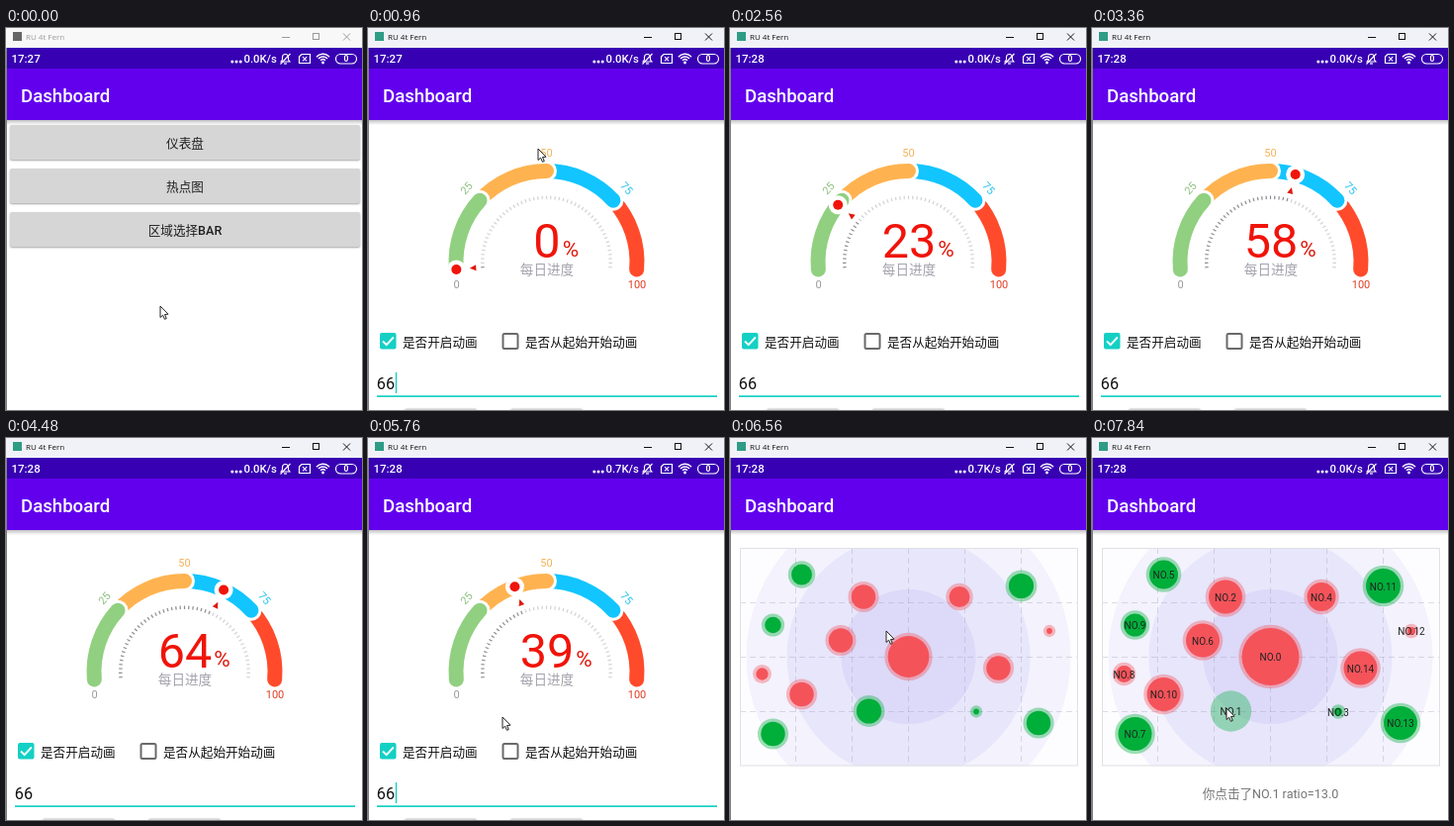
Recreate the animation shown at these times as an HTML page with a canvas. Size 360 by 386 pixels, loop 8 s.

```html
<!DOCTYPE html>
<html lang="zh">
<head>
<meta charset="utf-8">
<title>Dashboard</title>
<style>
html, body { margin: 0; width: 100%; height: 100%; overflow: hidden; background: #fff; }
canvas { display: block; width: 360px; height: 386px; }
</style>
</head>
<body>
<canvas id="stage"></canvas>
<script>
const W = 360, H = 386, LOOP = 8000, STEP = 160;
const canvas = document.getElementById('stage');
const ratio = window.devicePixelRatio || 1;
canvas.width = W * ratio;
canvas.height = H * ratio;
const ctx = canvas.getContext('2d');
const FAMILY = "Roboto, 'Noto Sans CJK SC', 'Noto Sans CJK', sans-serif";
const RED = '#f0140a', TEAL = '#14d0c4', GREY = '#d6d6d6';

// Scene times
const GAUGE_AT = 960, MENU_AT = 6000, HEAT_AT = 6320, GROWN_AT = 6653, CLICK_AT = 7360;

const pointerPath = [
  [0, 156, 281], [240, 156, 281], [640, 172, 122], [960, 172, 122],
  [1760, 143, 297], [2080, 170, 392], [5200, 110, 392], [5760, 136, 282],
  [6160, 165, 163], [6320, 165, 163], [6560, 158, 195], [7200, 136, 273], [LOOP, 136, 273]
];
const valuePath = [
  [GAUGE_AT, 0], [1600, 20.4], [2500, 20.4], [3360, 58.4], [4480, 63.5],
  [5000, 66], [5200, 66], [5760, 39.2], [MENU_AT, 28]
];

// x, y, radius, 1 = red / 0 = green; the index is the label
const spots = [
  [180.5, 221, 29, 1], [140.5, 276, 17.5, 0], [135, 160.5, 17, 1], [249, 276.5, 4, 0],
  [232, 160.5, 14.5, 1], [72.5, 138, 14.5, 0], [112, 204.5, 17, 1], [43.5, 299, 17, 0],
  [32.5, 238.5, 8.5, 1], [43.5, 189, 11.5, 0], [72.5, 259, 17, 1], [294.5, 149.5, 17.5, 0],
  [323, 195, 4, 1], [312, 288, 17, 0], [271.5, 232.5, 17, 1]
];

function sample(path, t, col) {
  if (t <= path[0][0]) return path[0][col];
  for (let i = 1; i < path.length; i++) {
    const a = path[i - 1], b = path[i];
    if (t <= b[0]) return a[col] + (b[col] - a[col]) * (t - a[0]) / (b[0] - a[0]);
  }
  return path[path.length - 1][col];
}

function rect(x, y, w, h, fill) {
  ctx.fillStyle = fill;
  ctx.fillRect(x, y, w, h);
}

function text(str, x, y, size, fill, align = 'left', weight = 400, family = FAMILY) {
  ctx.font = `${weight} ${size}px ${family}`;
  ctx.textAlign = align;
  ctx.fillStyle = fill;
  ctx.fillText(str, x, y);
}

function disc(x, y, r, fill) {
  ctx.beginPath();
  ctx.arc(x, y, r, 0, Math.PI * 2);
  ctx.fillStyle = fill;
  ctx.fill();
}

function line(points, stroke, width = 1) {
  ctx.beginPath();
  points.forEach(([x, y], i) => i ? ctx.lineTo(x, y) : ctx.moveTo(x, y));
  ctx.strokeStyle = stroke;
  ctx.lineWidth = width;
  ctx.stroke();
}

function roundBox(x, y, w, h, r) {
  ctx.beginPath();
  ctx.roundRect(x, y, w, h, r);
}

function button(x, y, w, label) {
  ctx.save();
  ctx.shadowColor = 'rgba(0,0,0,.35)';
  ctx.shadowBlur = 2 * ratio;
  ctx.shadowOffsetY = ratio;
  roundBox(x, y, w, 35, 2);
  ctx.fillStyle = GREY;
  ctx.fill();
  ctx.restore();
  if (label) text(label, x + w / 2, y + 22.5, 12.6, '#212121', 'center', 500);
}

function titleBar(active) {
  const ink = active ? '#111' : '#999';
  rect(0, 0, W, 20, active ? '#f1f2f8' : '#f8f8f8');
  rect(7, 4, 9, 9, active ? '#2f9c86' : '#666');
  text('RU 4t Fern', 20, 12, 8, ink, 'left', 400, "'Open Sans', sans-serif");
  line([[279, 9.5], [287, 9.5]], ink);
  ctx.strokeRect(310.5, 5.5, 6, 6);
  line([[341, 5.5], [348, 12.5]], ink);
  line([[348, 5.5], [341, 12.5]], ink);
}

function statusBar(t) {
  const clock = t < 2560 ? '17:27' : '17:28';
  const busy = t >= 5200 && t < 7200;
  const speed = busy ? '0.7' : t >= 1120 && t < 2400 ? '0.3' : '0.0';
  rect(0, 20, W, 21, '#3700b3');
  text(clock, 5.5, 35, 11.5, '#fff', 'left', 500);
  for (let i = 0; i < 3; i++) disc(228.8 + i * 4.2, 34, 1.5, '#fff');
  text(speed + 'K/s', 240.5, 35, 11.3, '#fff', 'left', 500);

  // Muted bell
  ctx.beginPath();
  ctx.moveTo(278, 34);
  ctx.lineTo(279.5, 32);
  ctx.lineTo(279.5, 29.5);
  ctx.arc(282.5, 29.5, 3, Math.PI, 0);
  ctx.lineTo(285.5, 32);
  ctx.lineTo(287, 34);
  ctx.closePath();
  ctx.strokeStyle = '#fff';
  ctx.lineWidth = 1.1;
  ctx.stroke();
  line([[281, 36], [284, 36]], '#fff', 1.2);
  line([[277.5, 36.5], [287.5, 26]], '#fff', 1.1);

  // Empty card slot
  line([[299, 26.5], [307.5, 26.5], [307.5, 35.5], [296.5, 35.5], [296.5, 29], [299, 26.5]], '#fff', 1.2);
  line([[300, 29.2], [304.2, 33.4]], '#fff', 1.1);
  line([[304.2, 29.2], [300, 33.4]], '#fff', 1.1);

  // Wireless
  for (const r of [3.3, 6, 8.7]) {
    ctx.beginPath();
    ctx.arc(320.5, 35, r, -Math.PI * .77, -Math.PI * .23);
    ctx.lineWidth = 1.5;
    ctx.stroke();
  }
  disc(320.5, 35, 1.4, '#fff');

  roundBox(333.5, 26.5, 21, 9.5, 4.7);
  ctx.lineWidth = 1.2;
  ctx.stroke();
  text('0', 344, 34.3, 8.5, '#fff', 'center', 700);
}

function toolBar() {
  rect(0, 41, W, 52, '#6200ee');
  const shade = ctx.createLinearGradient(0, 93, 0, 98);
  shade.addColorStop(0, 'rgba(0,0,0,.24)');
  shade.addColorStop(1, 'rgba(0,0,0,0)');
  rect(0, 93, W, 5, shade);
  text('Dashboard', 15, 75, 18.6, '#fff', 'left', 500);
}

function menu() {
  ['仪表盘', '热点图', '区域选择BAR'].forEach((label, i) => button(4, 98 + i * 44, 354, label));
}

const CX = 180.5, CY = 236, R = 91.5;
const angleOf = v => (-185 + v * 1.9) * Math.PI / 180;
const polar = (v, r) => [CX + r * Math.cos(angleOf(v)), CY + r * Math.sin(angleOf(v))];

function band(from, to, color) {
  ctx.lineCap = 'round';
  for (const [stroke, width] of [['#fff', 21], [color, 15]]) {
    // Only the leading end shows the white edge
    ctx.beginPath();
    ctx.arc(CX, CY, R, angleOf(stroke === '#fff' ? to - .1 : from), angleOf(to));
    ctx.strokeStyle = stroke;
    ctx.lineWidth = width;
    ctx.stroke();
  }
  ctx.lineCap = 'butt';
}

function dialLabel(str, v, r, color) {
  ctx.save();
  ctx.translate(...polar(v, r));
  ctx.rotate(angleOf(v) + Math.PI / 2);
  text(str, 0, 4, 11, color, 'center');
  ctx.restore();
}

function gauge(v) {
  const colors = ['#91d080', '#ffb350', '#12c5ff', '#ff4b2b'];
  for (let i = 3; i >= 0; i--) band(i * 25, i * 25 + 25, colors[i]);

  const ticks = 50;
  for (let i = 0; i <= ticks; i++) {
    const p = i * 100 / ticks;
    line([polar(p, 63), polar(p, 66.5)], p <= v ? '#8c8c94' : '#d2d2d6', 1.2);
  }

  text('0', 89.5, 263, 11, '#999', 'center');
  text('100', 272, 263, 11, '#e03a20', 'center');
  dialLabel('25', 25, 110, '#8cbf80');
  dialLabel('50', 50, 110, '#f5b25a');
  dialLabel('75', 75, 110, '#25c3ef');

  const [x, y] = polar(v, R);
  disc(x, y, 9.5, '#fff');
  disc(x, y, 5, RED);

  ctx.save();
  ctx.translate(...polar(v, 74.5));
  ctx.rotate(angleOf(v) + Math.PI / 2);
  ctx.beginPath();
  ctx.moveTo(0, -3.5);
  ctx.lineTo(3, 3);
  ctx.lineTo(-3, 3);
  ctx.fillStyle = '#e0180c';
  ctx.fill();
  ctx.restore();

  const num = String(Math.round(v));
  text(num, CX + .5, 231.5, 48.5, RED, 'center');
  const half = ctx.measureText(num).width / 2;
  text('%', CX + half + 2.5, 231, 22.5, '#e0180c');
  text('每日进度', CX + .5, 249, 13.6, '#a3a3ad', 'center');
}

function form(t) {
  roundBox(12, 308, 16.5, 16.5, 2);
  ctx.fillStyle = TEAL;
  ctx.fill();
  line([[15, 316.5], [18.7, 320.2], [25.8, 312.5]], '#fff', 1.9);
  text('是否开启动画', 35, 321.5, 12.6, '#111');

  roundBox(136.5, 309, 15, 15, 1.5);
  ctx.strokeStyle = '#6a6a6a';
  ctx.lineWidth = 2;
  ctx.stroke();
  text('是否从起始开始动画', 159, 321.5, 12.6, '#111');

  text('66', 8.8, 365, 16.2, '#111');
  rect(9, 371.3, 344, 1.7, TEAL);
  const phase = (t + (t < 5000 ? 200 : 500)) % 1000;
  if (phase < 500) rect(27.8, 348, 1.4, 21, TEAL);
  button(37, 384.5, 73);
  button(144, 384.5, 73);
}

function heatMap(t) {
  const scale = Math.min(1, (t - HEAT_AT) / (GROWN_AT - HEAT_AT));
  const clicked = t >= CLICK_AT;

  ctx.save();
  ctx.beginPath();
  ctx.rect(10, 111, 341.5, 220.5);
  ctx.clip();
  rect(10, 111, 342, 221, '#fdfdff');
  disc(180.5, 221, 164, '#f3f2fd');
  disc(180.5, 221, 123, '#e7e6fb');
  disc(180.5, 221, 68, '#dcdaf8');
  ctx.setLineDash([6, 4]);
  const grid = 'rgba(150,150,175,.32)';
  for (let i = 1; i < 6; i++) line([[9.5 + i * 57, 111], [9.5 + i * 57, 331]], grid);
  for (let i = 1; i < 4; i++) line([[10, 111.5 + i * 55], [352, 111.5 + i * 55]], grid);
  ctx.restore();
  ctx.strokeStyle = '#e0e0e4';
  ctx.lineWidth = 1;
  ctx.strokeRect(10.5, 111.5, 341, 219.5);

  spots.forEach(([x, y, r, red], i) => {
    const rgb = red ? '245,83,90' : '0,174,58';
    const size = r * scale;
    if (clicked && i === 1) {
      disc(x, y, r + 3.2, `rgba(${rgb},.36)`);
    } else {
      if (size > 0) disc(x, y, size + 3.3, `rgba(${rgb},.38)`);
      disc(x, y, size, `rgb(${rgb})`);
    }
    if (scale === 1) text('NO.' + i, x, y + 4, 10, '#222', 'center');
  });
  if (clicked) text('你点击了NO.1 ratio=13.0', 180.5, 364, 12.6, '#757575', 'center');
}

function pointer(x, y) {
  const shape = [[0, 0], [0, 11.5], [2.6, 9.2], [4.5, 13.3], [6.3, 12.5], [4.5, 8.5], [8, 8.2]];
  ctx.beginPath();
  shape.forEach(([dx, dy]) => ctx.lineTo(x + dx, y + dy));
  ctx.closePath();
  ctx.fillStyle = '#fff';
  ctx.fill();
  ctx.strokeStyle = '#222';
  ctx.lineWidth = 1;
  ctx.stroke();
}

function draw(t) {
  ctx.setTransform(ratio, 0, 0, ratio, 0, 0);
  rect(0, 0, W, H, '#fff');
  if (t >= HEAT_AT) heatMap(t);
  else if (t >= GAUGE_AT && t < MENU_AT) {
    gauge(sample(valuePath, t, 1));
    form(t);
  } else menu();
  toolBar();
  statusBar(t);
  titleBar(t >= 640);
  rect(0, 20, 1, H - 20, '#808088');
  pointer(sample(pointerPath, t, 1), sample(pointerPath, t, 2));
}

const start = performance.now();
function tick() {
  const t = (performance.now() - start) % LOOP;
  draw(Math.floor(t / STEP) * STEP);
  requestAnimationFrame(tick);
}
tick();
</script>
</body>
</html>
```
